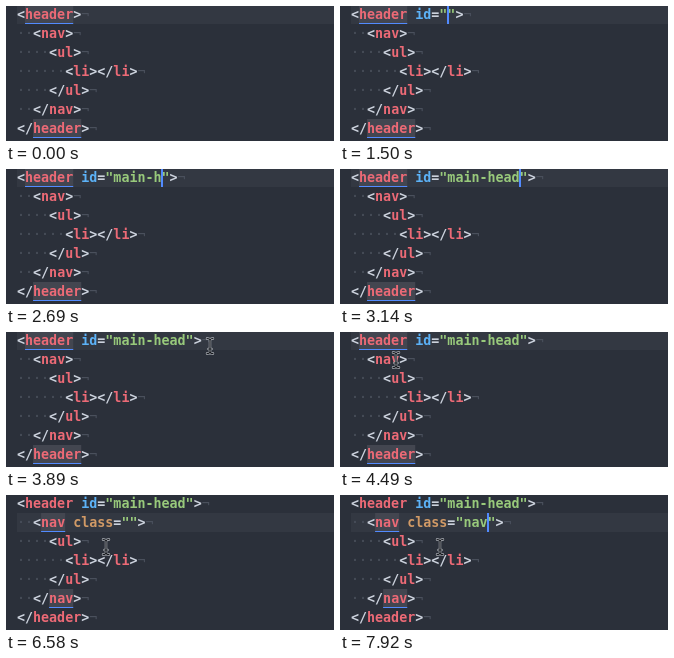
Write an HTML page that moves like this. It is 328x135 px and loops after 8000 ms.

```html
<!DOCTYPE html>
<html lang="en">
<head>
<meta charset="utf-8">
<title>Editor typing</title>
<style>
html, body { margin: 0; width: 100%; height: 100%; overflow: hidden; background: #2b303a; }
svg { display: block; width: 100vw; height: 100vh; }
text { font: 700 13.34px "DejaVu Sans Mono", "Noto Sans Mono", monospace; white-space: pre; }
.punct { fill: #ccd2dd; }
.tag { fill: #ec6a76; }
.id { fill: #5cb2f7; }
.class { fill: #d19a66; }
.str { fill: #98c97b; }
.faint { fill: #4a505c; font-weight: 400; }
</style>
</head>
<body>
<svg viewBox="0 0 328 135" xmlns="http://www.w3.org/2000/svg">
  <rect width="328" height="135" fill="#2b303a"/>
  <rect id="line" x="11" width="317" height="19" fill="#333842"/>
  <g id="marks"></g>
  <g id="code"></g>
  <rect id="caret" width="2" height="19" fill="#528bff"/>
  <g id="mouse" fill="none" stroke-linecap="round">
    <path id="halo" stroke="#b9bcc2" stroke-width="2.4"/>
    <path id="beam" stroke="#15181d" stroke-width="1.2"/>
  </g>
</svg>
<script>
const LOOP = 8000, LEFT = 11, CHAR = 8.03, ROW = 19;
const $ = id => document.getElementById(id);
const colX = col => LEFT + col * CHAR;
const rowY = row => row * ROW - 1;

const beam = "M-3 -7.5Q0 -7.5 0 -5.5Q0 -7.5 3 -7.5M0 -5.5V5.5M-3 7.5Q0 7.5 0 5.5Q0 7.5 3 7.5M-1.5 3H1.5";
$("halo").setAttribute("d", beam);
$("beam").setAttribute("d", beam);

// Times at which the caret flips; it starts hidden.
const flips = [300, 750, 1050, 3590, 4040, 4490, 4640, 5090,
               5540, 5990, 6140, 6580, 7030, 7480, 7780];

// Pointer positions: time, x, y
const moves = [
  [3740, 241, 11], [3890, 204, 14], [4040, 158, 19], [4190, 112, 23],
  [4340, 74, 27], [4490, 56, 28], [4640, 57, 28], [4790, 112, 43],
  [4940, 157, 52], [5090, 100, 52]
];

function stateAt(t) {
  const inNav = t >= 4640;
  const idLen = t < 1950 ? 0 : Math.min(9, 1 + Math.floor((t - 1940) / 149));
  const id = t < 1500 ? null : "main-head".slice(0, idLen);
  const cls = t < 6140 ? null : "nav".slice(0, t < 7780 ? 0 : t < 7920 ? 2 : 3);
  const col = inNav
    ? (cls === null ? 6 : 14 + cls.length)
    : (id === null ? 7 : 12 + id.length);
  return {
    id, cls, col, row: inNav ? 1 : 0,
    caret: flips.filter(f => f <= t).length % 2 === 1,
    mouse: moves.filter(m => m[0] <= t).pop()
  };
}

function rowMarkup(row, indent, parts) {
  let col = 0;
  const spans = [["faint", "·".repeat(indent)], ...parts, ["faint", "¬"]];
  const body = spans.map(([kind, s]) => {
    const safe = s.replace(/</g, "&lt;").replace(/>/g, "&gt;");
    const out = `<tspan class="${kind}" x="${colX(col).toFixed(2)}">${safe}</tspan>`;
    col += s.length;
    return s ? out : "";
  }).join("");
  return `<text y="${rowY(row) + 14}">${body}</text>`;
}

function open(name, attr, value) {
  const extra = value == null ? [] :
    [[attr, " " + attr], ["punct", "="], ["str", `"${value}"`]];
  return [["punct", "<"], ["tag", name], ...extra, ["punct", ">"]];
}
const close = name => [["punct", "</"], ["tag", name], ["punct", ">"]];

function codeMarkup(s) {
  return [
    [0, open("header", "id", s.id)],
    [2, open("nav", "class", s.cls)],
    [4, open("ul")],
    [6, [...open("li"), ...close("li")]],
    [4, close("ul")],
    [2, close("nav")],
    [0, close("header")]
  ].map(([indent, parts], row) => rowMarkup(row, indent, parts)).join("");
}

function mark(row, col, len) {
  const x = colX(col), w = len * CHAR, y = rowY(row);
  return `<rect x="${x}" y="${y}" width="${w}" height="${ROW}" fill="#434650"/>` +
    `<rect x="${x}" y="${y + ROW - 1}" width="${w}" height="1" fill="#528bff"/>`;
}

let shown = "";
function render(t) {
  const s = stateAt(t), key = JSON.stringify(s);
  if (key === shown) return;
  shown = key;
  $("line").setAttribute("y", rowY(s.row));
  $("marks").innerHTML = s.row
    ? mark(1, 3, 3) + mark(5, 4, 3)
    : mark(0, 1, 6) + mark(6, 2, 6);
  $("code").innerHTML = codeMarkup(s);
  $("caret").setAttribute("x", Math.floor(colX(s.col)));
  $("caret").setAttribute("y", rowY(s.row));
  $("caret").setAttribute("visibility", s.caret ? "visible" : "hidden");
  $("mouse").setAttribute("visibility", s.mouse ? "visible" : "hidden");
  if (s.mouse) $("mouse").setAttribute("transform", `translate(${s.mouse[1]} ${s.mouse[2]})`);
}

const start = performance.now();
function tick() {
  render((performance.now() - start) % LOOP);
  requestAnimationFrame(tick);
}
tick();
</script>
</body>
</html>
```
